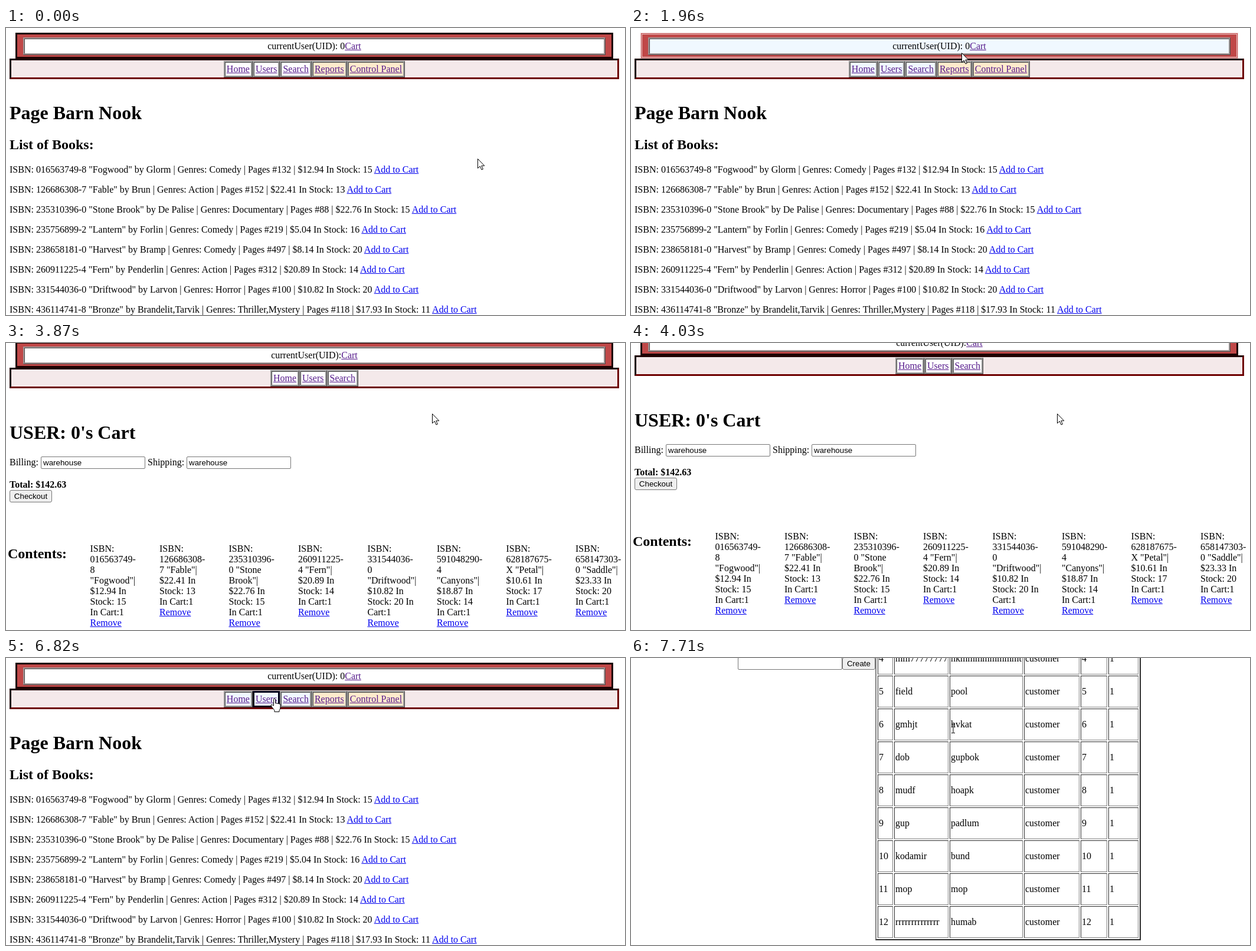
An HTML page that plays this animation: 1049x488 px, repeating every 7990 ms.

```html
<!DOCTYPE html>
<html lang="en">
<head>
<meta charset="utf-8">
<title>Book shop</title>
<style>
html, body { margin: 0; width: 100%; height: 100%; overflow: hidden; background: #fff; }
body { position: relative; font: 16px/18px "Liberation Serif", "Times New Roman", serif; color: #000; }
.page, .page > div, .page > table { position: absolute; white-space: pre; box-sizing: border-box; }
.page { left: 0; top: 0; width: 1049px; }
a { color: #00e; text-decoration: underline; }
.page > .head { left: 16px; top: 8px; width: 1013px; height: 44px; padding: 5px 10px; background: #c04848; border: 3px solid #1e0000; }
.head div { box-sizing: border-box; height: 30px; padding: 3px; border: 3px ridge #a09494; background: #fff; text-align: center; }
.page > .head.hover { border: 3px double #ecc; }
.head.hover div { background: aliceblue; }
.page > .nav { left: 6px; top: 52px; width: 1033px; height: 35px; padding-top: 1px; display: flex; justify-content: center; background: #f4e9ea; border: 3px solid; border-color: #1e0000 #6e0000 #6e0000 #1e0000; }
.nav span { box-sizing: border-box; height: 28px; padding: 2px; border: 3px ridge #999; background: #fff; }
.blue .nav span { background: aliceblue; }
.page .nav span.staff { background: #ffebcd; }
.nav span.hover { border: 3px solid #000018; }
.head a, .nav a { color: #551a8b; }
.h1 { font: bold 32px/36px "Liberation Serif", serif; }
.h2 { font: bold 24px/27px "Liberation Serif", serif; }
.b { font-weight: bold; }
.field, .button { height: 21px; border: 1px solid #767676; border-radius: 2px; font: 13.33px/19px "Liberation Sans", Arial, sans-serif; }
.field { width: 177px; padding-left: 3px; }
.button { background: #efefef; border-radius: 3px; text-align: center; }
.page > table { left: 414px; top: 108px; width: 450px; table-layout: fixed; border-spacing: 2px; border: 2px solid; border-color: #808080 #2c2c2c #2c2c2c #808080; }
td, th { box-sizing: border-box; height: 54px; padding: 1px; border: 1px solid; border-color: #2c2c2c #808080 #808080 #2c2c2c; text-align: left; }
th { height: 22px; overflow: hidden; }
#status { position: absolute; left: 0; bottom: 0; height: 22px; padding: 0 7px 0 3px; background: #d9dbdf; border-radius: 0 4px 0 0; color: #505357; font: 11.5px/22px "Open Sans", "Noto Sans", sans-serif; }
#cursor { position: absolute; left: 0; top: 0; width: 1px; height: 1px; overflow: visible; }
#cursor path { fill: #fff; stroke: #000; stroke-linejoin: round; }
</style>
</head>
<body>
<div id="books" class="page"></div>
<div id="cart" class="page"></div>
<div id="users" class="page"></div>
<div id="status"></div>
<svg id="cursor"><path/></svg>
<script>
const LOOP = 7990;
const $ = id => document.getElementById(id);
const at = (x, y, html, cls = '', w = '') =>
  `<div class="${cls}" style="left:${x}px;top:${y}px;${w && `width:${w}px`}">${html}</div>`;
const link = text => `<a>${text}</a>`;
const banner = (who, staff) =>
  `<div class="head"><div>currentUser(UID):${who}${link('Cart')}</div></div><div class="nav">` +
  ['Home', 'Users', 'Search'].map(s => `<span>${link(s)}</span>`).join('') +
  (staff ? ['Reports', 'Control Panel'].map(s => `<span class="staff">${link(s)}</span>`).join('') : '') + '</div>';

const stock = [
  '016563749-8 "Fogwood" by Glorm | Genres: Comedy | Pages #132 | $12.94 In Stock: 15',
  '126686308-7 "Fable" by Brun | Genres: Action | Pages #152 | $22.41 In Stock: 13',
  '235310396-0 "Stone Brook" by De Palise | Genres: Documentary | Pages #88 | $22.76 In Stock: 15',
  '235756899-2 "Lantern" by Forlin | Genres: Comedy | Pages #219 | $5.04 In Stock: 16',
  '238658181-0 "Harvest" by Bramp | Genres: Comedy | Pages #497 | $8.14 In Stock: 20',
  '260911225-4 "Fern" by Penderlin | Genres: Action | Pages #312 | $20.89 In Stock: 14',
  '331544036-0 "Driftwood" by Larvon | Genres: Horror | Pages #100 | $10.82 In Stock: 20',
  '436114741-8 "Bronze" by Brandelit,Tarvik | Genres: Thriller,Mystery | Pages #118 | $17.93 In Stock: 11'
];
$('books').innerHTML = banner(' 0', true) +
  at(6, 126, 'Page Barn Nook', 'h1') + at(6, 185, 'List of Books:', 'h2') +
  stock.map((s, i) => at(6, 232 + 34 * i, `ISBN: ${s} ${link('Add to Cart')}`)).join('');

// "/" marks a line break
const items = [
  '016563749-/8/"Fogwood"|/$12.94 In/Stock: 15/In Cart:1',
  '126686308-/7 "Fable"|/$22.41 In/Stock: 13/In Cart:1',
  '235310396-/0 "Stone/Brook"|/$22.76 In/Stock: 15/In Cart:1',
  '260911225-/4 "Fern"|/$20.89 In/Stock: 14/In Cart:1',
  '331544036-/0/"Driftwood"|/$10.82 In/Stock: 20 In/Cart:1',
  '591048290-/4/"Canyons"|/$18.87 In/Stock: 14/In Cart:1',
  '628187675-/X "Petal"|/$10.61 In/Stock: 17/In Cart:1',
  '658147303-/0 "Saddle"|/$23.33 In/Stock: 20/In Cart:1'
];
$('cart').innerHTML = banner('', false) +
  at(6, 144, "USER: 0's Cart", 'h1') +
  at(6, 204, 'Billing:') + at(59, 203, 'warehouse', 'field') +
  at(240, 204, 'Shipping:') + at(306, 203, 'warehouse', 'field') +
  at(6, 242, 'Total: $142.63', 'b') + at(6, 260, 'Checkout', 'button', 72) +
  at(3, 355, 'Contents:', 'h2') +
  items.map((s, i) => at(142.5 + 117.5 * i, 351,
    `ISBN:\n${s.replaceAll('/', '\n')}\n${link('Remove')}`)).join('');

const people = ['admin admin', 'first page', 'second page', 'mm77777777 hkmmmmmmmmt', 'field pool',
  'gmhjt hvkat', 'dob gupbok', 'mudf hoapk', 'gup padlum', 'kodamir bund', 'mop mop', 'rrrrrrrrrrrrrr humab'];
const row = (cells, tag) => `<tr>${cells.map(c => `<${tag}>${c}</${tag}>`).join('')}</tr>`;
$('users').innerHTML = banner(' 0', true) +
  at(181, 329, '', 'field') + at(358, 329, 'Create', 'button', 56) +
  '<table>' + [26, 92, 124, 94, 45, 51].map(w => `<col style="width:${w}px">`).join('') +
  row(['ID', 'Username', 'Password', 'Permission', 'Cart', 'Level'], 'th') +
  people.map((p, i) => row([i + 1, ...p.split(' '), 'customer', i + 1, 1], 'td')).join('') + '</table>';

const shapes = {
  arrow: 'M.5.5v16l3.8-3.5 2.7 6 2.4-1-2.6-5.8h5z',
  hand: 'M-1.5 12V1.5a1.5 1.5 0 0 1 3 0V8q1.5-1.2 3 .5 1.5-1 3 .5 2-.6 2.5 1.2V15q0 3-2 5v2.5H0V20Q-4 15-6 12q0-2.5 2.2-1.5z',
  beam: 'M-3-7.5h2.5L0-7l.5-.5H3M0-7V7M-3 7.5h2.5L0 7l.5.5H3'
};
// time, x, y, pointer shape from then on
const path = [
  [0, 799, 222, 'arrow'], [190, 799, 222, 'arrow'], [370, 787, 218, 'arrow'], [470, 787, 218, 'arrow'],
  [790, 654, 240, 'hand'], [880, 654, 240, 'arrow'], [1330, 813, 170, 'arrow'], [1690, 730, 94, 'arrow'],
  [1960, 560, 42, 'arrow'], [2230, 588, 34, 'hand'], [2500, 622, 66, 'hand'], [2590, 650, 80, 'arrow'],
  [2860, 722, 120, 'arrow'], [4570, 722, 120, 'arrow'], [5380, 510, 44, 'hand'], [5560, 489, 41, 'hand'],
  [5830, 489, 41, 'arrow'], [6460, 476, 70, 'hand'], [6640, 453, 67, 'hand'], [6730, 453, 67, 'hand'],
  [6820, 455, 69, 'hand'], [7160, 546, 120, 'arrow'], [7530, 546, 120, 'beam'], [LOOP, 546, 120, 'beam']
];
// linear 0..1 progress, held between screen captures
const ramp = (t, start, length, step) =>
  Math.min(1, Math.max(0, Math.floor((t - start) / step) * step / length));

function pointer(t) {
  const i = path.findLastIndex(k => k[0] <= t);
  const [t0, x, y, kind] = path[i], [t1, x1, y1] = path[i + 1];
  const k = ramp(t, t0, t1 - t0, 90);
  return [x + (x1 - x) * k, y + (y1 - y) * k, kind];
}

function draw() {
  const t = performance.now() % LOOP;
  const [x, y, kind] = pointer(t);
  const name = t >= 6910 ? 'users' : t >= 3230 && t < 5920 ? 'cart' : 'books';
  const scroll = { books: 0, cart: 31 * ramp(t, 3790, 240, 80), users: 330 * ramp(t, 7260, 450, 90) }[name];
  for (const p of document.querySelectorAll('.page')) p.style.display = p.id === name ? '' : 'none';
  const page = $(name);
  page.style.transform = `translateY(${-Math.round(scroll)}px)`;
  page.classList.toggle('blue', t >= 1780 && t < 3230 || t >= 4750);
  for (const el of page.querySelectorAll('.head, .nav span')) {
    const r = el.getBoundingClientRect();
    el.classList.toggle('hover', x >= r.left && x < r.right && y >= r.top && y < r.bottom);
  }
  const status = $('status');
  status.textContent = t < 3000 ? 'localhost:3000/cart/add' : 'localhost:3000/books';
  status.hidden = !(t >= 970 && t < 1240 || t >= 5740 && t < 5920);
  const tip = $('cursor').firstElementChild;
  tip.setAttribute('d', shapes[kind]);
  tip.setAttribute('transform', `translate(${Math.round(x)} ${Math.round(y)})`);
  requestAnimationFrame(draw);
}
draw();
</script>
</body>
</html>
```
